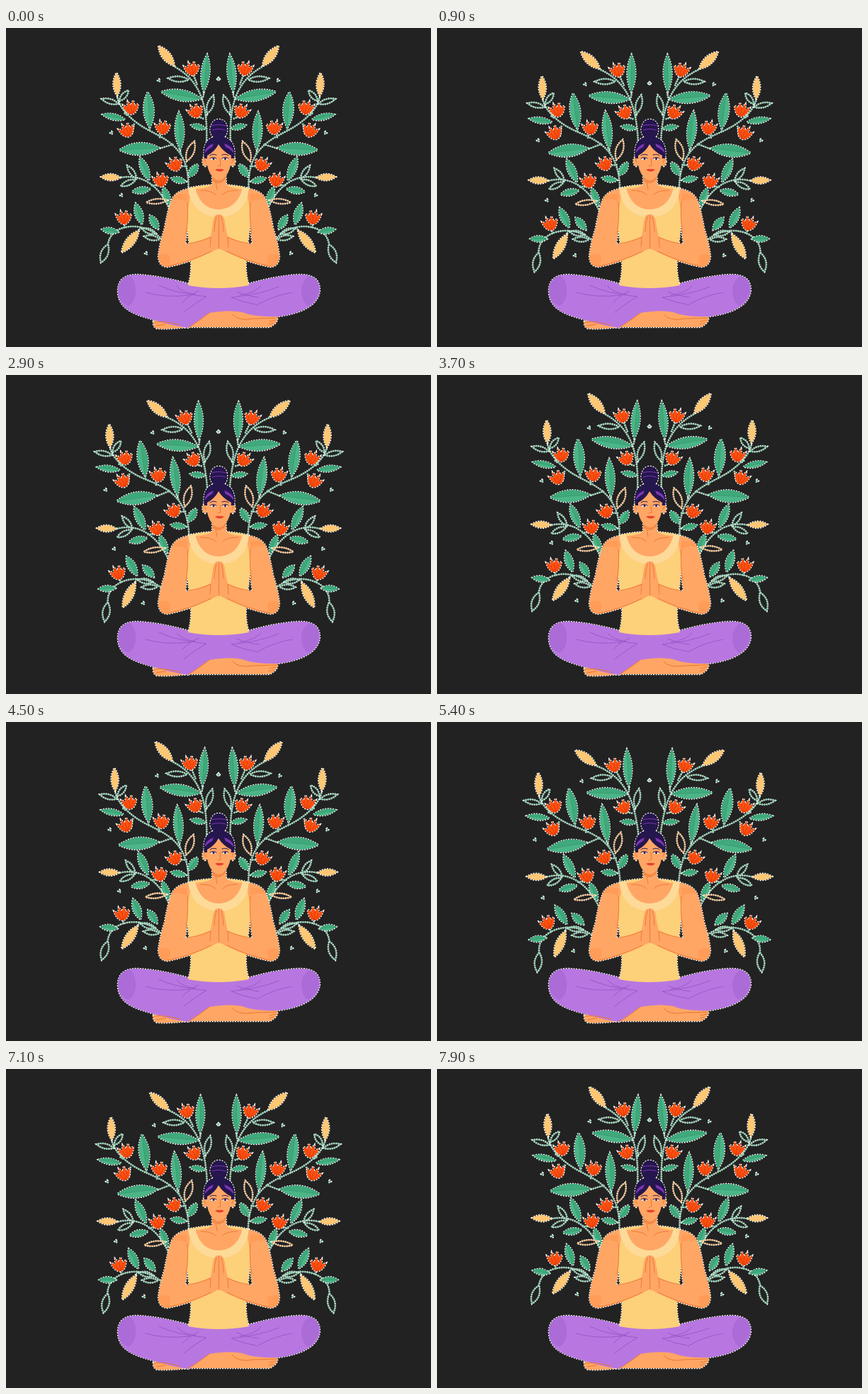
Write an HTML page that moves like this. It is 600 px wide and 450 px high and loops after 8000 ms.

```html
<!DOCTYPE html>
<html lang="en">
<head>
<meta charset="utf-8">
<title>Meditation</title>
<style>
html, body { margin: 0; width: 100%; height: 100%; overflow: hidden; background: #222; }
svg { display: block; width: 100vw; height: 100vh; }
.edge { stroke: #fff; stroke-width: 2.4; stroke-dasharray: 2 1.6; paint-order: stroke; }
.dots { fill: none; stroke: #fff; stroke-width: 2.6; stroke-dasharray: 1.6 1.6; }
.line { fill: none; stroke-width: 1; stroke-linecap: round; stroke-linejoin: round; }
.stem { stroke: #86ccaa; stroke-width: 1.3; }
</style>
</head>
<body>
<svg viewBox="0 0 600 450">
  <defs>
    <g id="side"></g>
    <g id="figure">
      <path fill="#ffa665" d="M208 414Q230 407 256 410L290 400Q340 396 383 407Q385 416 372 422L255 422Q235 425 213 424Q207 421 208 414Z"/>
      <path fill="#b877e0" d="M258 361Q220 350 187 348C166 347 157 357 158 373C160 400 187 405 213 413Q235 420 257 423Q270 414 287 402Q315 397 334 401Q350 408 384 407C420 402 441 390 443 370C443 354 433 347 411 348Q380 350 342 361Q300 370 258 361Z"/>
      <path fill="#fdd07a" d="M257 226Q300 216 343 226L346 262Q342 300 339 330Q338 348 343 363Q300 371 257 363Q262 348 261 330Q258 300 254 262Z"/>
      <path fill="#ffa665" d="M291 205L310 205L311 220Q314 226 335 227Q327 257 300 257Q273 257 266 227Q288 226 291 220Z"/>
      <g id="arm">
        <path fill="#ffa665" d="M262 226Q240 229 234 242Q228 258 224 282Q217 304 215 322Q216 337 228 337Q262 331 300 311L300 264Q293 263 292 276L289 294Q270 302 257 305L253 304Q257 285 257 256Z"/>
      </g>
      <use href="#arm" transform="matrix(-1 0 0 1 601 0)"/>
      <ellipse fill="#ffa665" cx="281" cy="188" rx="3.500" ry="7"/>
      <ellipse fill="#ffa665" cx="320" cy="188" rx="3.500" ry="7"/>
      <path fill="#25164d" d="M280 184Q277 159 293 154Q287 148 289 140Q292 129 300 129Q310 129 312 140Q313 149 308 154Q325 159 322 184Z"/>
    </g>
  </defs>

  <use href="#side"/>
  <use href="#side" transform="matrix(-1 0 0 1 600 0)"/>

  <use href="#figure" class="edge"/>
  <use href="#figure"/>

  <!-- clothes and limbs -->
  <path fill="#ab6cd8" d="M174 349C153 354 154 386 173 392Q185 385 183 366Q182 354 174 349ZM428 350C448 355 445 382 426 392Q416 384 417 367Q420 354 428 350Z"/>
  <g class="line" stroke="#9a58cc">
    <path d="M197 373Q223 381 260 377M216 363Q237 374 283 379Q270 386 251 401M241 364Q247 373 268 376M272 371Q257 378 249 387"/>
    <path d="M404 373Q378 377 354 391M385 365Q359 376 318 380Q334 387 353 390M360 364Q351 374 330 377M326 372Q339 378 357 380"/>
  </g>
  <g class="line" stroke="#e9782f">
    <path d="M257 423Q270 415 287 402M320 404Q328 414 350 410L382 409M372 414L381 412M371 418L378 416M209 415Q225 413 245 419M212 420L225 418"/>
  </g>
  <path fill="#fdda98" d="M257 226L267 225Q274 255 300 256Q327 255 334 225L343 226Q339 266 300 267Q262 265 257 226Z"/>
  <path fill="#ff9c58" d="M234 242Q239 232 256 234L256 245Q246 240 234 242ZM367 242Q362 232 345 234L345 245Q355 240 367 242ZM215 322Q224 315 232 322Q233 332 227 337Q217 336 215 322ZM386 322Q377 315 369 322Q368 332 374 337Q384 336 386 322Z"/>
  <path fill="#ffa665" d="M300.500 263Q293 262 292 276L289 295L290 314L300.500 311L312 314L313 295L309 276Q308 262 300.500 263Z"/>
  <g class="line" stroke="#ef7b35">
    <path d="M256 246Q258 266 254 290M345 246Q343 266 347 290M300.500 264V311M297 266Q294 277 294 287M304 266Q307 277 307 287M289 295L288 309M313 295L314 309M257 304Q274 302 289 295M344 304Q327 302 313 295"/>
    <path d="M228 336Q260 330 290 315M373 336Q341 330 312 315M275 229Q290 229 296 235M327 229Q311 229 306 235M296 217L298 228"/>
  </g>

  <!-- head -->
  <path fill="#f48a48" d="M291 209Q300 220 310 208L310 213Q301 224 291 215Z"/>
  <path fill="#ffa665" d="M284 180Q295 174 300 164Q306 174 318 180L317 193Q315 206 306 213Q301 217 295 213Q286 206 284 193Z"/>
  <path fill="#7d35b4" d="M281 173Q284 166 293 163L291 168Q286 170 281 176ZM321 173Q318 166 308 163L310 168Q316 170 321 176Z"/>
  <path class="line" stroke="#7d35b4" stroke-width="2" d="M290 138Q300 135 311 138M291 144Q300 141 310 144"/>
  <path class="line" stroke="#25164d" stroke-width="1.8" d="M288 180Q291 177 297 179M305 179Q311 177 314 180"/>
  <path fill="#fff" d="M288 185Q292 182 297 185Q292 187 288 185ZM305 185Q310 182 314 185Q310 187 305 185Z"/>
  <g fill="#25164d"><circle cx="293" cy="184.500" r="1.500"/><circle cx="309.500" cy="184.500" r="1.500"/></g>
  <path class="line" stroke="#25164d" d="M288 184Q292 181 297 184M305 184Q310 181 314 184"/>
  <path class="line" stroke="#e9782f" d="M302 184L303 194L299 195M280 185L282 190M321 185L319 190"/>
  <path fill="#e5442d" d="M295 200Q299 198 301.500 199Q304 198 308 200Q302 205 295 200Z"/>
</svg>

<script>
const side = document.getElementById('side');

const dotted = (d, color = '#86ccaa') =>
  `<path class="dots" d="${d}"/><path class="line stem" style="stroke:${color}" d="${d}"/>`;

// Pointed leaf from base (x, y) to tip (u, v), w wide; sway is its own turn at the base
function leaf(kind, x, y, u, v, w, sway = 0) {
  const dx = u - x, dy = v - y, k = w * .85 / Math.hypot(dx, dy);
  const mx = (x + u) / 2, my = (y + v) / 2;
  const half = s => `${mx - s * dy * k} ${my + s * dx * k}`;
  const shape = `M${x} ${y}Q${half(1)} ${u} ${v}Q${half(-1)} ${x} ${y}Z`;
  if (kind === 'hollow') return dotted(shape);
  if (kind === 'peach') return dotted(shape, '#f9bd80');
  if (kind === 'gold')
    return `<g class="sway" data-turn="${sway}" data-pivot="${x} ${y}">
      <path class="edge" fill="#fdc774" d="${shape}"/></g>`;
  return `<path class="edge" fill="#4cb588" d="${shape}"/>
    <path fill="#40a97c" d="M${x} ${y}Q${half(1)} ${u} ${v}Z"/>
    <path class="line" stroke="#389f72" stroke-width=".6" d="M${x} ${y}L${u} ${v}"/>`;
}

const flower = (x, y, turn) => `<g transform="translate(${x} ${y}) rotate(${turn})">
  <path class="edge" fill="#ff5010" d="M1 10C-6 9-9 3-11-4L-5-1-4-9 0-3 4-10 6-2 11-5C10 3 7 9 1 10Z"/>
  <path class="line" stroke="#d83c0c" stroke-width=".7" d="M0 9Q-4 4-5-1M1 9Q2 3 0-3M1 9Q5 5 6-2"/></g>`;

// Each branch swings by `turn` degrees around its pivot
const branches = [
  { pivot: '283 150', turn: -9.300, parts: [
    dotted('M283 162C285 110 276 75 237 54M265 67L270 80M279 128L271 125M283 142L278 141M282 126L285 120M280 90L278 98'),
    leaf('gold', 238, 54, 215, 25, 14, -9), leaf('green', 279, 90, 284, 37, 14),
    leaf('green', 276, 100, 219, 90, 18), leaf('hollow', 258, 73, 229, 71, 9),
    leaf('hollow', 284, 121, 293, 95, 10), leaf('green', 282, 142, 261, 137, 9),
    flower(262, 57, -3), flower(267, 117, -16)] },
  { pivot: '225 216', turn: -7.300, parts: [
    dotted('M257 234C262 175 232 160 205 146C175 131 160 112 157 97M167 120L171 123M181 135L178 149M217 155L218 150M203 145V140M247 178L245 170M256 195L245 195M256 217L250 214M217 170L236 164'),
    leaf('gold', 157, 96, 156, 63, 12, 7), leaf('hollow', 159, 107, 135, 100, 8),
    leaf('hollow', 160, 103, 173, 88, 8), leaf('green', 168, 129, 136, 122, 10),
    leaf('green', 203, 141, 200, 90, 17), leaf('green', 217, 169, 160, 172, 20),
    leaf('green', 246, 172, 244, 118, 15), leaf('peach', 255, 188, 266, 160, 12),
    leaf('green', 254, 217, 233, 212, 10), leaf('green', 258, 210, 271, 192, 12),
    flower(176, 112, -2), flower(170, 144, -14), flower(221, 140, 3), flower(238, 192, -16)] },
  { pivot: '245 300', turn: -5.800, parts: [
    dotted('M236 270C222 225 195 205 162 211M205 222L214 222'),
    leaf('gold', 162, 211, 134, 210, 11, 5), leaf('hollow', 184, 212, 171, 194, 8),
    leaf('hollow', 183, 214, 162, 223, 8), leaf('green', 202, 215, 189, 182, 13),
    leaf('green', 204, 227, 178, 231, 11), leaf('green', 231, 250, 222, 224, 11),
    leaf('peach', 228, 243, 198, 246, 8), flower(218, 214, -2)] },
  { pivot: '219 314', turn: -17.500, parts: [
    dotted('M224 303C200 270 148 274 144 305M168 282L167 277M188 285L190 280'),
    leaf('hollow', 144, 305, 134, 331, 12), leaf('green', 159, 288, 135, 284, 10),
    leaf('green', 192, 277, 183, 247, 13), leaf('green', 215, 284, 203, 264, 12),
    leaf('hollow', 212, 290, 192, 283, 8), leaf('hollow', 217, 298, 195, 294, 8),
    leaf('gold', 188, 285, 163, 317, 14), flower(166, 267, 0)] }
];

// Drifting sparkles: raised place, lowered place
const sparkles = [[300, 72, 300, 84], [216, 74, 203, 85], [149, 148, 137, 169],
  [163, 236, 148, 250], [198, 318, 192, 324]];

side.innerHTML =
  branches.map(b => `<g class="branch">${b.parts.join('')}</g>`).join('') +
  sparkles.map(() => '<path class="spark edge" fill="#6fc39b" d="M0-2L2 0 0 2-2 0Z"/>').join('');
const branchNodes = side.querySelectorAll('.branch');
const swayNodes = side.querySelectorAll('.sway');
const sparkNodes = side.querySelectorAll('.spark');

const rotate = (node, angle, pivot) => node.setAttribute('transform', `rotate(${angle} ${pivot})`);

function draw(now) {
  const t = Math.floor(now % 8000 / 100) * 100;
  const lift = ((1 + Math.cos(t / 4000 * 2 * Math.PI)) / 2) ** 1.3;
  const drop = 1 - lift;
  branches.forEach((b, i) => rotate(branchNodes[i], b.turn * drop, b.pivot));
  swayNodes.forEach(n => rotate(n, n.dataset.turn * drop, n.dataset.pivot));
  sparkles.forEach(([x, y, u, v], i) =>
    sparkNodes[i].setAttribute('transform', `translate(${x + (u - x) * drop} ${y + (v - y) * drop})`));
}

const start = performance.now();
(function loop() {
  draw(performance.now() - start);
  requestAnimationFrame(loop);
})();
</script>
</body>
</html>
```
